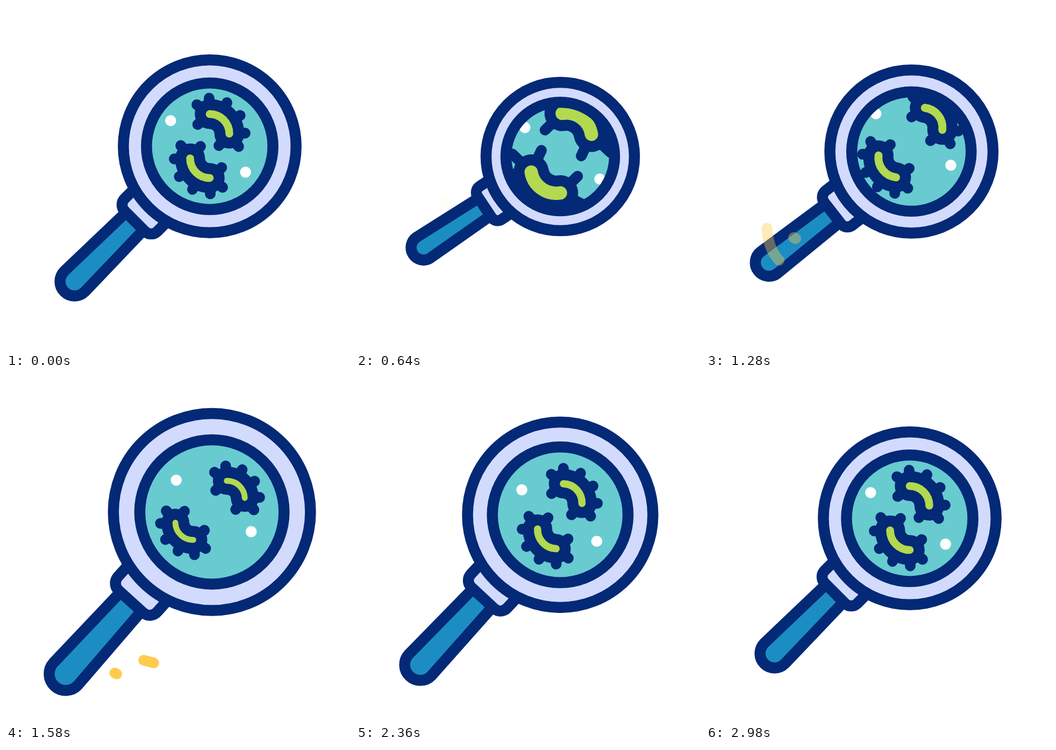
An HTML page with a canvas that plays this animation: 640x640 px, repeating every 3.02 s.

```html
<!DOCTYPE html>
<html lang="en">
<head>
<meta charset="utf-8">
<title>Magnifier</title>
<style>
  html, body { margin: 0; width: 100%; height: 100%; overflow: hidden; background: #fff; }
  canvas { display: block; width: 640px; height: 640px; }
</style>
</head>
<body>
<canvas id="stage" width="640" height="640"></canvas>
<script>
const ctx = document.getElementById('stage').getContext('2d');
const LOOP = 3020, LINE = 20.5, TAU = Math.PI * 2, RAD = Math.PI / 180;
const NAVY = '#042976', LILAC = '#d2dbfd', TEAL = '#67cbd0',
      BLUE = '#1b8dc2', GREEN = '#b2d94f', YELLOW = '#ffcb4f';

const polar = (r, deg) => [r * Math.cos(deg * RAD), r * Math.sin(deg * RAD)];
const bezier = (a, b, c, d, u) => {
  const v = 1 - u;
  return a * v * v * v + 3 * b * u * v * v + 3 * c * u * u * v + d * u * u * u;
};
const along = ([p, q, r, s], u) => [0, 1].map(k => bezier(p[k], q[k], r[k], s[k], u));

const sine = x => (1 - Math.cos(Math.PI * x)) / 2;
// cubic-bezier(.4, 0, .3, 1)
function swift(x) {
  let lo = 0, hi = 1;
  for (let i = 0; i < 24; i++) {
    const mid = (lo + hi) / 2;
    if (bezier(0, 0.4, 0.3, 1, mid) < x) lo = mid; else hi = mid;
  }
  return lo * lo * (3 - 2 * lo);
}
const span = (t, from, to, ease) => ease(Math.min(1, Math.max(0, (t - from) / (to - from))));

// Rest, shrink, grow, back to rest; the culture starts ahead of the glass
function phases(t, ahead) {
  const shrink = span(t, 20, 740, swift);
  const grow = span(t, ahead ? 740 : 1040, 1880, swift);
  const back = ahead ? span(t, 1960, 2680, swift) : span(t, 2056, 2762, swift);
  return (rest, small, big) =>
    rest + (small - rest) * shrink + (big - small) * grow + (rest - big) * back;
}

function paint(fill, width, color = NAVY) {
  if (fill) { ctx.fillStyle = fill; ctx.fill(); }
  ctx.strokeStyle = color;
  ctx.lineWidth = width;
  ctx.stroke();
}

function circle(x, y, r) {
  ctx.beginPath();
  ctx.arc(x, y, r, 0, TAU);
}

function handle(x, y, scale, turn) {
  ctx.save();
  ctx.translate(x, y);
  ctx.rotate((45 + turn) * RAD);
  ctx.scale(scale, scale);

  ctx.beginPath();
  ctx.moveTo(23, 190);
  ctx.arc(0, 355.7, 27, 0, Math.PI);
  ctx.lineTo(-23, 190);
  ctx.closePath();
  paint(BLUE, LINE / scale);

  ctx.beginPath();
  ctx.moveTo(-43, 130);
  ctx.arcTo(-43, 197, 0, 197, 16);
  ctx.arcTo(43, 197, 43, 130, 16);
  ctx.lineTo(43, 130);
  ctx.closePath();
  paint(LILAC, LINE / scale);
  ctx.restore();
}

// The body is a quarter ring; legs fan out along its back and around both ends
const BEND = 36.5, HALF = 18.5;
function leg(at, dir, size, reach) {
  const [rx, ry] = polar(BEND, at), [lx, ly] = polar(29.5, dir);
  ctx.moveTo((rx - HALF) * size, (ry + HALF) * size);
  ctx.lineTo((rx - HALF + lx) * reach, (ry + HALF + ly) * reach);
}

function germ(x, y, turn, size, reach) {
  ctx.save();
  ctx.translate(x, y);
  ctx.rotate(turn * RAD);
  ctx.beginPath();
  for (let a = -90; a <= 0; a += 30) leg(a, a - 2, size, reach);
  for (const dir of [54, 131]) {
    leg(0, dir, size, reach);
    leg(-90, -90 - dir, size, reach);
  }
  paint(null, 20);

  ctx.beginPath();
  ctx.arc(-HALF * size, HALF * size, BEND * size, -Math.PI / 2, 0);
  paint(null, 35 * size + LINE);
  paint(null, 35 * size - LINE, GREEN);
  ctx.restore();
}

function culture(t, pose) {
  const dx = pose(0, 8, 10.6), dy = pose(0, 13, -25.5);
  ctx.fillStyle = '#fff';
  for (const side of [-1, 1]) {
    circle(376 + side * 69.7 + dx, 261.2 + side * 47.9 + dy, 10.3);
    ctx.fill();
  }
  const strength = span(t, 0, 640, sine) * (1 - span(t, 1900, 2762, sine));
  const sway = -strength * (1.5 + 8 * Math.cos(TAU * (t - 640) / 1260));
  const size = pose(1, 1.3, 0.87);
  const reach = size + Math.max(0, -sway) * 0.02;
  const x = pose(379, 382, 379.5), y = pose(260.5, 274, 244.5);
  const [ox, oy] = polar(pose(45.4, 62.4, 62), pose(-66, -62, -37.8));
  germ(x + ox, y + oy, sway, size, reach);
  germ(x - ox, y - oy, sway + 180, size, reach);
}

function lens(t, x, y, scale, pose) {
  const outer = 160.7 * scale, inner = outer * 0.732;
  circle(x, y, outer);
  paint(LILAC, LINE);

  ctx.save();
  circle(x, y, inner);
  ctx.fillStyle = TEAL;
  ctx.fill();
  ctx.clip();
  culture(t, pose);
  ctx.restore();

  circle(x, y, inner);
  paint(null, LINE);
}

const SWOOSH = [[113, 408], [117, 480], [150, 498], [275, 530]];
const SPECK = [[167, 366], [155, 450], [180, 535], [225, 572]];

function sparks(t) {
  if (t < 620 || t >= 1640) return;
  ctx.save();
  ctx.globalAlpha = 0.04 + 0.96 * Math.pow(span(t, 640, 1580, x => x), 2.6);
  const width = 20 * Math.min(1, (1640 - t) / 60);

  const head = span(t, 1080, 1540, sine), tail = span(t, 1240, 1640, sine);
  if (head > tail) {
    ctx.beginPath();
    for (let i = 0; i <= 20; i++) ctx.lineTo(...along(SWOOSH, tail + (head - tail) * i / 20));
    paint(null, width, YELLOW);
  }

  const [x, y] = along(SPECK, Math.pow(span(t, 640, 1640, x => x), 3));
  ctx.beginPath();
  ctx.moveTo(x - 2, y - 1);
  ctx.lineTo(x + 2, y + 1);
  paint(null, width, YELLOW);
  ctx.restore();
}

function draw(t) {
  ctx.fillStyle = '#fff';
  ctx.fillRect(0, 0, 640, 640);
  ctx.lineCap = ctx.lineJoin = 'round';
  const glass = phases(t, false), inside = phases(t, true);
  const x = inside(379, 380, 383.3), y = glass(261, 280.3, 245);
  const scale = glass(1, 0.857, 1.18);
  handle(x, y, scale, glass(0, 11.5, -4.9));
  lens(t, x, y, scale, inside);
  sparks(t);
}

const start = performance.now();
function tick() {
  draw((performance.now() - start) % LOOP);
  requestAnimationFrame(tick);
}
tick();
</script>
</body>
</html>
```
